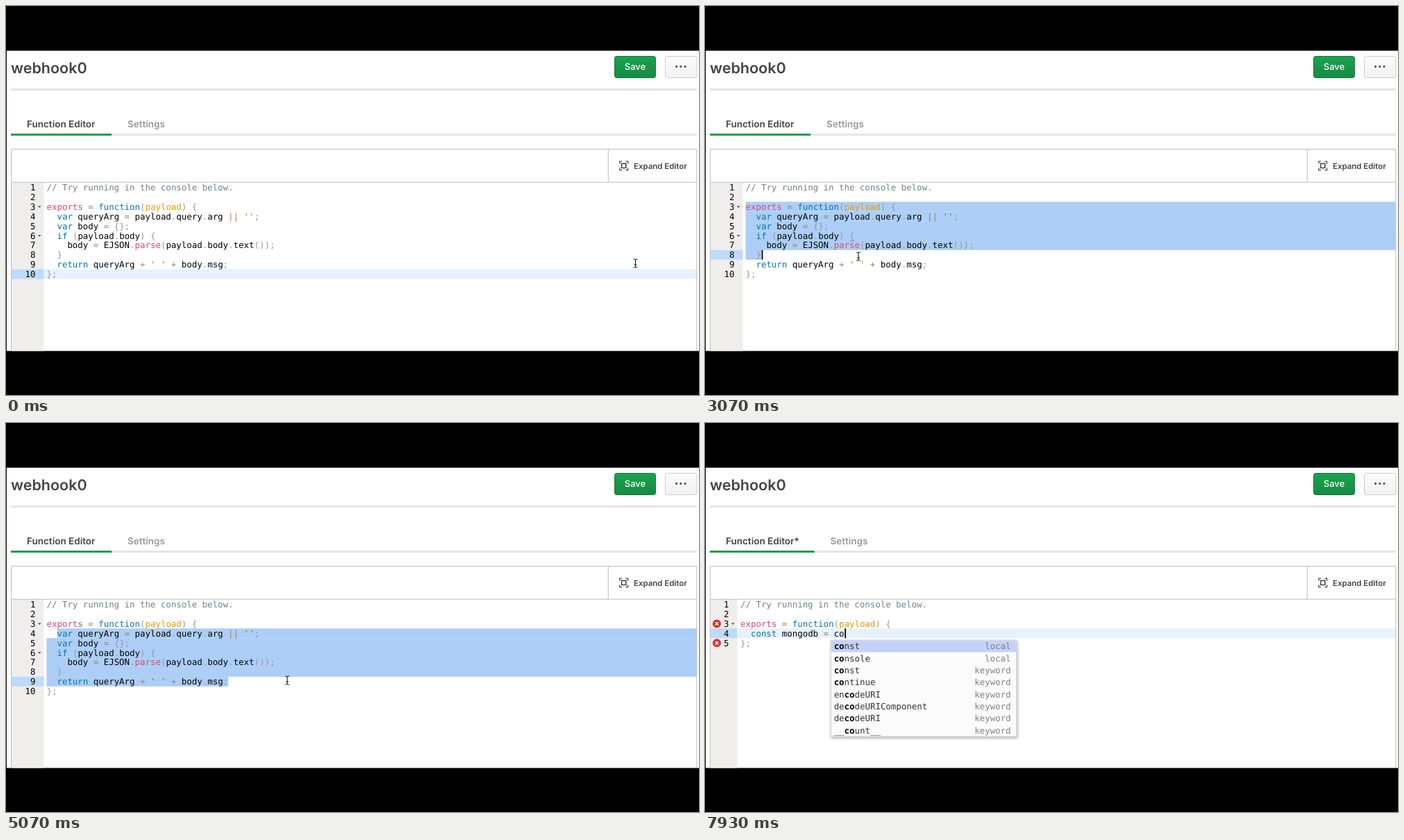
Animation, 998 px wide and 561 px high, one loop 8000 ms. Source, as an HTML page:

```html
<!DOCTYPE html>
<html lang="en">
<head>
<meta charset="utf-8">
<title>Function editor</title>
<style>
html, body { margin: 0; width: 100%; height: 100%; overflow: hidden; background: #000; }
svg { display: block; width: 100%; height: 100%; }
text { white-space: pre; text-rendering: geometricPrecision; font: 600 13.5px Inter, sans-serif; fill: #444; }
.code text { font: 12.425px "DejaVu Sans Mono", monospace; fill: #000; }
.code .end { text-anchor: end; }
.code .item { fill: #333; }
.code .kind { fill: #808080; text-anchor: end; }
.hit { font-weight: bold; fill: #000; }
.panel { fill: #fbfbfb; stroke: #d3d3d3; filter: drop-shadow(1px 2px 2px rgba(0, 0, 0, .32)); }
</style>
</head>
<body>
<svg viewBox="0 0 998 561">
  <defs>
    <linearGradient id="green" x2="0" y2="1"><stop stop-color="#1ba34f"/><stop offset="1" stop-color="#168a42"/></linearGradient>
    <linearGradient id="pale" x2="0" y2="1"><stop stop-color="#fcfcfc"/><stop offset="1" stop-color="#f1f1f1"/></linearGradient>
    <clipPath id="page"><path d="M1 64.5H998V497.5H1Z"/></clipPath>
  </defs>
  <path d="M0 0H998V561H0Z"/>
  <g clip-path="url(#page)">
    <path fill="#fff" d="M0 64H998V498H0Z"/>
    <text x="7" y="96.5" style="font-size:21.5px">webhook0</text>
    <path fill="#e5e5e5" d="M7 119H995V122H7ZM7 184H995V187H7Z"/>
    <rect x="876.5" y="72.5" width="59" height="31" rx="3" fill="url(#green)" stroke="#137a3a"/>
    <text x="906" y="92.2" text-anchor="middle" style="font-size:13px;font-weight:500;fill:#fff">Save</text>
    <rect x="949.5" y="72.5" width="45.5" height="31" rx="3" fill="url(#pale)" stroke="#ccc"/>
    <path d="M965.6 87.3h0M971.8 87.3h0M978 87.3h0" stroke="#494949" stroke-width="3.2" stroke-linecap="round"/>
    <text id="tab" x="30" y="175"></text>
    <text id="settings" y="175" style="fill:#999">Settings</text>
    <path id="bar" fill="#1a9c4b"/>
    <g id="editor" class="code"></g>
    <path fill="none" stroke="#bdbdbd" d="M7.5 500V206.5H994.8V500M7.5 254.2H994.8M867.3 206.5V254"/>
    <path fill="none" stroke="#444" stroke-width="1.3" d="M887 224.2H883.8V227.4M892.4 224.2H895.6V227.4M887 236.6H883.8V233.4M892.4 236.6H895.6V233.4"/>
    <path fill="none" stroke="#444" stroke-width="1.6" d="M886.6 227.3h6.2v6.2h-6.2z"/>
    <text x="904" y="235" style="font-size:11.45px">Expand Editor</text>
    <path id="mouse" fill="none" stroke="#111" stroke-width="1.1" d="M-3 -6Q-.4 -6 0 -4.6Q.4 -6 3 -6M0 -4.6V4.8M-3 6.2Q-.4 6.2 0 4.8Q.4 6.2 3 6.2M-1.8 2H1.8"/>
  </g>
</svg>
<script>
const $ = id => document.getElementById(id);
const LOOP = 8000, STEP = 1000 / 15;
const CW = 7.48, LH = 13.9, TOP = 254.6, RIGHT = 994.5, ITEM = 17.36;
const DELETED = 5467;

const head = ["// Try running in the console below.", "", "exports = function(payload) {"];
const full = [...head,
  "  var queryArg = payload.query.arg || '';",
  "  var body = {};",
  "  if (payload.body) {",
  "    body = EJSON.parse(payload.body.text());",
  "  }",
  "  return queryArg + ' ' + body.msg;",
  "};"];

// Pointer path: time, x, y, easing into the point
const linear = p => p, inOut = p => p * p * (3 - 2 * p), out = p => 1 - (1 - p) ** 2;
const path = [
  [0, 906.5, 371], [867, 102, 288.5, inOut], [1467, 60, 287, out], [1867, 60, 287], [1933, 60, 285],
  [2067, 119, 306], [2133, 145, 320], [2333, 199, 350, out], [2867, 199, 350], [2933, 203, 352.5],
  [3000, 212, 358], [3067, 221, 361], [3467, 80, 306, inOut], [3667, 75, 300], [3733, 76, 298],
  [3800, 225, 332], [3867, 320, 354], [4000, 405, 384, out], [4333, 405, 384], [4467, 405, 371]];

// Selection drags: start, end, anchor row and column
const drags = [[1933, 3000, 2, 0], [3667, 4467, 3, 2]];
const mates = { "7,3": [5, 20], "5,21": [7, 2] };

const typed = [
  [DELETED, ""], [5533, "c"], [6067, "co"], [6200, "con"], [6267, "cons"], [6400, "const"], [6733, "const "],
  [6867, "const m"], [6933, "const mo"], [7067, "const mon"], [7200, "const mong"], [7267, "const mongo"],
  [7400, "const mongod"], [7467, "const mongodb"], [7600, "const mongodb "], [7733, "const mongodb = "],
  [7867, "const mongodb = c"], [7933, "const mongodb = co"]];

// Gutter marks: time, then row and kind pairs
const lint = [[0], [6000, [3, warning]], [6600, [2, error], [4, error]], [7267, [3, error]], [7733, [2, error], [4, error]]];

const blinks = [-770, 1933, 2400, 3000, 3667, 4000, 4533, ...typed.map(e => e[0])];

// A leading * marks a local name
const hints = {
  c: "*console const case catch continue class decodeURIComponent decodeURI",
  co: "*console const continue encodeURI decodeURIComponent decodeURI __count__ encodeURIComponent",
  con: "*console const continue decodeURIComponent __count__ encodeURIComponent",
  cons: "*console const",
  m: "Math import implements document arguments Namespace encodeURIComponent decodeURIComponent",
  mo: "import encodeURIComponent decodeURIComponent",
  mon: "encodeURIComponent decodeURIComponent"
};

const tokens = [
  [/\/\/.*/, "#708090"], [/'[^']*'/, "#690"], [/(?<=function\()\w+/, "#e90"],
  [/\b(?:var|function|if|return|const)\b/, "#07a"], [/\b(?:exports|parse)\b/, "#dd4a68"],
  [/[=+]|\|\|/, "#a67f59"], [/[(){};.]/, "#999"]];
const lexer = new RegExp(tokens.map(([re]) => `(${re.source})`).join("|"), "g");

const paint = line => line.replace(lexer, (word, ...groups) =>
  `<tspan fill="${tokens[groups.findIndex((g, i) => i < tokens.length && g !== undefined)][1]}">${word}</tspan>`);
const rowY = row => TOP + row * LH;
const rect = (x, y, w, h, fill) => `<rect x="${x}" y="${y}" width="${w}" height="${h}" fill="${fill}"/>`;
const text = (x, y, body, cls = "") => `<text x="${x}" y="${y}" class="${cls}">${body}</text>`;
const latest = (list, t) => list.filter(e => e[0] <= t).pop();

function warning(y) {
  return `<path d="M15 ${y + 1.8}L20.6 ${y + 12}H9.4Z" fill="#f0a63c" stroke="#f0a63c" stroke-linejoin="round"/>
    <path d="M15 ${y + 5}v3.6M15 ${y + 10}v1.2" stroke="#fff" stroke-width="1.3"/>`;
}

function error(y) {
  return `<circle cx="17" cy="${y + 7.1}" r="6" fill="#d8322d"/>
    <path d="M14.8 ${y + 4.9}l4.4 4.4m0 -4.4l-4.4 4.4" stroke="#fff" stroke-width="1.6"/>`;
}

function pointer(t) {
  const i = path.findIndex(p => p[0] > t);
  if (i < 0) return path[path.length - 1].slice(1, 3);
  const [t0, x0, y0] = path[i - 1], [t1, x1, y1, ease = linear] = path[i];
  const p = ease((t - t0) / (t1 - t0));
  return [x0 + (x1 - x0) * p, y0 + (y1 - y0) * p];
}

// The caret trails the pointer by one step
function dragCaret([start, end], t, left) {
  const [x, y] = pointer(Math.min(Math.max(Math.round(t - STEP), start), end));
  const row = Math.min(full.length - 1, Math.floor((y - TOP) / LH));
  const col = Math.max(0, Math.round((x - left) / CW));
  return [row, Math.min(col, full[row].length)];
}

function selection([r0, c0], [r1, c1], left) {
  let s = "";
  for (let r = r0; r <= r1; r++) {
    const x0 = left + (r === r0 ? c0 * CW : 0);
    const x1 = r === r1 ? left + c1 * CW : RIGHT;
    s += rect(x0, rowY(r), Math.max(0, x1 - x0), LH + .1, "#accef7");
  }
  return s;
}

function highlight(name, word) {
  let from = 0, s = "";
  for (const ch of word) {
    const at = name.toLowerCase().indexOf(ch, from);
    s += name.slice(from, at) + `<tspan class="hit">${name[at]}</tspan>`;
    from = at + 1;
  }
  return s + name.slice(from);
}

function popup(line, left) {
  const word = (line.match(/\w+$/) || [""])[0];
  if (!hints[word]) return "";
  let names = hints[word].split(" ");
  if (line.includes("mongodb =")) names = ["*const", ...names];
  names = names.slice(0, 8);
  const x = left + (line.length - word.length) * CW, y = 313.2;
  let s = `<rect class="panel" x="${x - 4.5}" y="${y}" width="267.5" height="${names.length * ITEM}"/>`
    + rect(x - 4, y + .5, 266.5, ITEM - .6, "#c4d2fa");
  names.forEach((name, i) => {
    const base = y + i * ITEM + 13, local = name[0] === "*";
    s += text(x, base, highlight(name.replace("*", ""), word), "item")
      + text(x + 254.8, base, local ? "local" : "keyword", "kind");
  });
  return s;
}

function draw(t) {
  const edited = t >= DELETED;
  const gutter = edited ? 46.5 : 54.5, left = edited ? 51 : 58.5;
  const entry = edited ? "  " + latest(typed, t)[1] : "";
  const lines = edited ? [...head, entry, "};"] : full;
  const drag = !edited && latest(drags, t);
  const caret = edited ? [3, entry.length] : drag ? dragCaret(drag, t, left) : [9, 2];
  const selected = drag && (caret[0] > drag[2] || caret[0] === drag[2] && caret[1] > drag[3]);
  const y = rowY(caret[0]);

  let s = rect(8, 254, gutter - 8, 244, "#f0eded") + rect(8, y, gutter - 8, LH, "#bddbfa");
  s += selected ? selection(drag.slice(2), caret, left) : rect(gutter, y, RIGHT - gutter, LH, "#e6f2ff");

  lines.forEach((line, r) => {
    const base = rowY(r) + 11.4;
    s += text(gutter - 12, base, r + 1, "end") + text(left, base, paint(line));
    if (line.endsWith("{")) s += `<path d="M${gutter - 8.8} ${base - 5.6}h5l-2.5 3z" fill="#666"/>`;
  });

  const mate = drag && mates[caret];
  if (mate) s += rect(left + mate[1] * CW, rowY(mate[0] + 1) + .4, CW, .9, "#8a8a8a");
  for (const [row, icon] of latest(lint, t).slice(1)) s += icon(rowY(row));

  const since = t - blinks.filter(b => b <= t).pop();
  if (since % 1000 < 500) s += rect(left + caret[1] * CW + .6, y, 1.8, LH, "#000");
  if (edited) s += popup(entry, left);
  $("editor").innerHTML = s;

  $("tab").textContent = "Function Editor" + (edited ? "*" : "");
  $("settings").setAttribute("x", edited ? 180.5 : 175);
  $("bar").setAttribute("d", `M7 184H${edited ? 157.5 : 152}V187H7Z`);
  $("mouse").setAttribute("visibility", edited ? "hidden" : "visible");
  $("mouse").setAttribute("transform", `translate(${pointer(t)})`);
}

let shown = -1;
const began = performance.now();
function tick() {
  const t = (performance.now() - began) % LOOP;
  const step = Math.min(Math.floor((t + 4) / STEP), LOOP / STEP - 1);
  if (step !== shown) draw(Math.round((shown = step) * STEP));
  requestAnimationFrame(tick);
}
tick();
</script>
</body>
</html>
```
